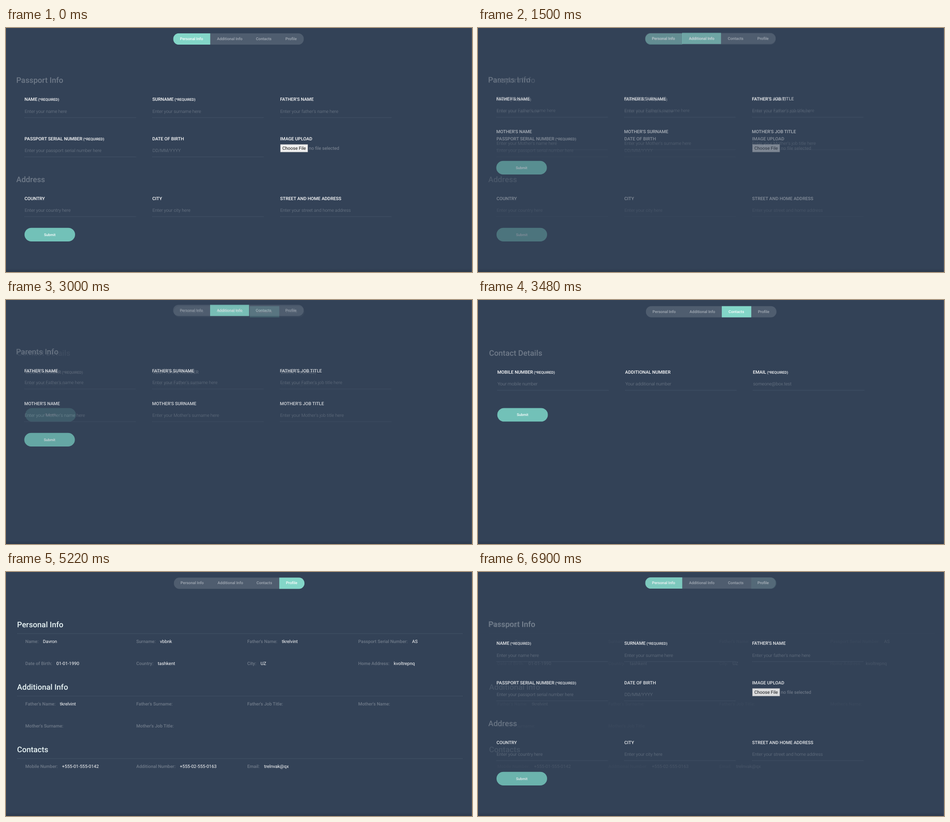
These frames come from a looping animation (1032 px wide and 543 px high, 6960 ms). An HTML page:

```html
<!DOCTYPE html>
<html lang="en">
<head>
<meta charset="utf-8">
<title>Form tabs</title>
<style>
  html, body { margin: 0; width: 100%; height: 100%; overflow: hidden; background: #334257; }
  svg { display: block; width: 1032px; height: 543px; }
  text { font: 400 10.03px Roboto, sans-serif; text-rendering: geometricPrecision; white-space: pre; }
  .title { font-size: 17.2px; font-weight: 500; fill: #6f7a89; }
  .bright { fill: #e8f4f5; }
  .label { font-weight: 500; fill: #fff; }
  .note { font-size: 8.03px; }
  .hint { font-weight: 300; fill: #76818f; }
  .tab { font-size: 8.6px; font-weight: 500; fill: #a4acb6; }
  .on { fill: #fff; }
  .submit { font-size: 8.03px; font-weight: 500; fill: #fff; text-anchor: middle; }
  .key { font-weight: 500; fill: #6f7a89; }
  .value { font-weight: 400; fill: #fff; }
  .rule { stroke: #506074; stroke-width: .8; stroke-dasharray: 2 1; }
</style>
</head>
<body>
<svg viewBox="0 0 1032 543">
  <defs>
    <linearGradient id="foot" x1="0" y1="0" x2="0" y2="1">
      <stop offset="0" stop-color="#334257"/>
      <stop offset="1" stop-color="#2c394c"/>
    </linearGradient>
    <clipPath id="pill"><rect width="289.3" height="25.4" rx="12.7"/></clipPath>
  </defs>
</svg>
<script>
const LOOP = 6960, HOLD = 1200, STEP = 60, SPAN = 1740;
const svg = document.querySelector('svg');

function add(parent, tag, attrs, text) {
  const el = document.createElementNS('http://www.w3.org/2000/svg', tag);
  for (const k in attrs) el.setAttribute(k, attrs[k]);
  if (text) el.textContent = text;
  parent.append(el);
  return el;
}
const box = (g, x, y, width, height, fill, rx = 0) =>
  add(g, 'rect', { x, y, width, height, fill, rx });
const write = (g, cls, x, y, text) => add(g, 'text', { class: cls, x, y }, text);
const rule = (g, x1, x2, y) => add(g, 'line', { class: 'rule', x1, x2, y1: y, y2: y });

const TABS = [
  ['Personal Info', 0], ['Additional Info', 82], ['Contacts', 168.2], ['Profile', 233.5]
];

function page(active, navX, navY) {
  const g = add(svg, 'g', {});
  box(g, 0, 0, 1032, 543, '#334257');
  box(g, 0, 535, 1032, 8, 'url(#foot)');
  box(g, 1031, 0, 1, 543, '#47566a');
  const nav = add(g, 'g', { transform: `translate(${navX} ${navY})` });
  const pill = add(nav, 'g', { 'clip-path': 'url(#pill)' });
  box(pill, 0, 0, 289.3, 25.4, '#4f5d6f');
  const left = TABS[active][1], right = active < 3 ? TABS[active + 1][1] : 289.3;
  box(pill, left, 0, right - left, 25.4, '#83d6c8');
  TABS.forEach(([name, x], i) => write(nav, i === active ? 'tab on' : 'tab', x + 14.9, 15.2, name));
  return g;
}

function field(g, x, y, name, hint, required) {
  const t = write(g, 'label', x, y, name);
  if (required) add(t, 'tspan', { class: 'note' }, ' (*REQUIRED)');
  if (!hint) return;
  write(g, 'hint', x + .4, y + 26.5, hint);
  rule(g, x, x + 247, y + 37.1);
}

// Three fields side by side; a trailing * marks a required one.
function row(g, x, y, fields) {
  fields.forEach(([name, hint], i) =>
    field(g, x + i * 283, y, name.replace('*', ''), hint, name.endsWith('*')));
}

function submit(g, x, y) {
  box(g, x, y, 112, 30.2, '#72c1b8', 15.1);
  write(g, 'submit', x + 56, y + 17.9, 'Submit');
}

function personal() {
  const g = page(0, 370.3, 11.7);
  write(g, 'title', 22.7, 122, 'Passport Info');
  row(g, 41, 162.2, [
    ['NAME*', 'Enter your name here'],
    ['SURNAME*', 'Enter your surname here'],
    ["FATHER'S NAME", "Enter your father's name here"]
  ]);
  row(g, 41, 249.7, [
    ['PASSPORT SERIAL NUMBER*', 'Enter your passport serial number here'],
    ['DATE OF BIRTH', 'DD/MM/YYYY'],
    ['IMAGE UPLOAD']
  ]);
  box(g, 607.3, 258.7, 61.4, 17.8, '#8a8f96');
  box(g, 608, 259.4, 60, 16.4, '#efefef');
  add(g, 'text', { x: 612, y: 270.8, fill: '#111' }, 'Choose File');
  add(g, 'text', { x: 670.8, y: 270.8, fill: '#828b98' }, 'no file selected');
  write(g, 'title', 22.7, 342.6, 'Address');
  row(g, 41, 382.7, [
    ['COUNTRY', 'Enter your country here'],
    ['CITY', 'Enter your city here'],
    ['STREET AND HOME ADDRESS', 'Enter your street and home address']
  ]);
  submit(g, 41, 444.7);
  return g;
}

function additional() {
  const g = page(1, 370, 10.4);
  write(g, 'title', 22.2, 120.8, 'Parents Info');
  ['Father', 'Mother'].forEach((who, i) =>
    row(g, 40.6, 160.9 + i * 72.8, ['name', 'surname', 'job title'].map(part =>
      [`${who}'s ${part}`.toUpperCase(), `Enter your ${who}'s ${part} here`])));
  submit(g, 40.5, 295.8);
  return g;
}

function contacts() {
  const g = page(2, 371.7, 13.4);
  write(g, 'title', 24.5, 123.7, 'Contact Details');
  row(g, 42.8, 163.8, [
    ['MOBILE NUMBER*', 'Your mobile number'],
    ['ADDITIONAL NUMBER', 'Your additional number'],
    ['EMAIL*', 'someone@box.test']
  ]);
  submit(g, 42.7, 240.4);
  return g;
}

function section(g, y, name, pairs) {
  write(g, 'title bright', 24.5, y, name);
  rule(g, 25, 1011, y + 14.5);
  pairs.forEach(([key, value], i) => {
    const t = write(g, 'key', 42.8 + i % 4 * 245.7, y + 35.2 + (i >> 2) * 49.2, key + ':');
    if (value) add(t, 'tspan', { class: 'value', dx: 9.6 }, value);
  });
}

function profile() {
  const g = page(3, 371.7, 12.3);
  section(g, 122.5, 'Personal Info', [
    ['Name', 'Davron'], ['Surname', 'vbbnk'], ["Father's Name", 'tkrelvint'],
    ['Passport Serial Number', 'AS'], ['Date of Birth', '01-01-1990'],
    ['Country', 'tashkent'], ['City', 'UZ'], ['Home Address', 'kvoltrepnq']
  ]);
  section(g, 261.6, 'Additional Info', [
    ["Father's Name", 'tkrelvint'], ["Father's Surname"], ["Father's Job Title"],
    ["Mother's Name"], ["Mother's Surname"], ["Mother's Job Title"]
  ]);
  section(g, 400.7, 'Contacts', [
    ['Mobile Number', '+555-01-555-0142'], ['Additional Number', '+555-02-555-0163'],
    ['Email', 'trelnvak@qx']
  ]);
  return g;
}

const pages = [personal(), additional(), contacts(), profile()];

// Each page holds, then the next one fades over it in ten steps.
function draw(now) {
  const t = now % LOOP, at = Math.floor(t / SPAN), local = t % SPAN;
  const mix = local < HOLD ? 0 : (Math.floor((local - HOLD) / STEP) + 1) / 10;
  const from = pages[at], to = pages[(at + 1) % 4];
  for (const p of pages) p.style.display = p === from || (p === to && mix) ? '' : 'none';
  // The later page in the tree lies on top, so only its opacity varies.
  const wraps = at === 3;
  from.style.opacity = wraps ? 1 - mix : 1;
  to.style.opacity = wraps ? 1 : mix;
}

const start = performance.now();
function tick() {
  draw(performance.now() - start);
  requestAnimationFrame(tick);
}
draw(0);
requestAnimationFrame(tick);
</script>
</body>
</html>
```
